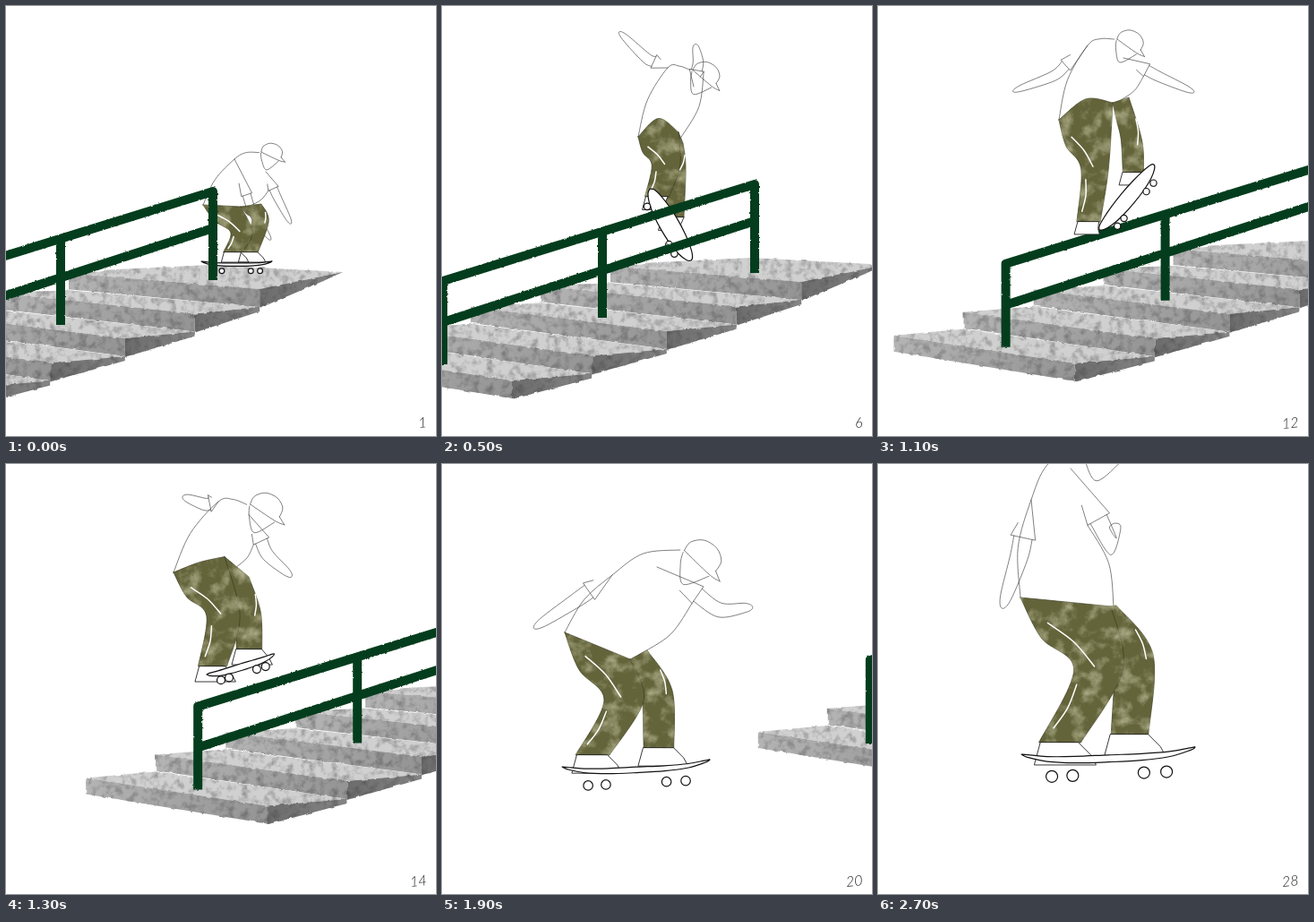
Recreate the animation shown at these times as an HTML page. Size 480x480 px, loop 2.8 s.

```html
<!DOCTYPE html>
<html lang="en">
<head>
<meta charset="utf-8">
<title>Skater on a handrail</title>
<style>
html, body { margin: 0; width: 100%; height: 100%; overflow: hidden; background: #fff; }
svg { display: block; width: 100vw; height: 100vh; }
path, circle { stroke-linejoin: round; stroke-linecap: round; }
.cloth { fill: #64643b; stroke: #3a3a20; stroke-width: .7; }
.thin { fill: none; stroke: #4a4a4a; stroke-width: .7; }
.shoe { fill: #fff; stroke: #222; stroke-width: .9; }
.deck { fill: #fff; stroke: #111; stroke-width: 1.2; }
.shine { fill: none; stroke: #fff; stroke-width: 1.5; }
text { font: italic 300 16px Lato, sans-serif; fill: #222; text-anchor: end; }
</style>
</head>
<body>
<svg id="stage" viewBox="0 0 480 480">
  <defs>
    <linearGradient id="riser"><stop stop-color="#b4b4b4"/><stop offset="1" stop-color="#949494"/></linearGradient>
    <linearGradient id="side"><stop stop-color="#6c6c6c"/><stop offset="1" stop-color="#858585"/></linearGradient>
    <filter id="concrete" filterUnits="userSpaceOnUse" x="-140" y="265" width="650" height="190" color-interpolation-filters="sRGB">
      <feTurbulence type="fractalNoise" baseFrequency=".12" numOctaves="5" seed="4" result="n"/>
      <feDisplacementMap in="SourceGraphic" in2="n" scale="3" xChannelSelector="R" yChannelSelector="G" result="rough"/>
      <feColorMatrix in="n" values="0 0 0 0 .2  0 0 0 0 .2  0 0 0 0 .2  .9 0 0 0 -.4" result="dirt"/>
      <feComposite in="dirt" in2="rough" operator="in" result="stain"/>
      <feMerge><feMergeNode in="rough"/><feMergeNode in="stain"/></feMerge>
    </filter>
    <filter id="brush" filterUnits="userSpaceOnUse" x="-20" y="170" width="400" height="250" color-interpolation-filters="sRGB">
      <feTurbulence type="fractalNoise" baseFrequency=".3" numOctaves="2" seed="7" result="n"/>
      <feDisplacementMap in="SourceGraphic" in2="n" scale="2.2" xChannelSelector="R" yChannelSelector="G"/>
    </filter>
    <filter id="wash" filterUnits="userSpaceOnUse" x="100" y="80" width="240" height="270" color-interpolation-filters="sRGB">
      <feTurbulence type="fractalNoise" baseFrequency=".06" numOctaves="5" seed="11" result="n"/>
      <feColorMatrix in="n" values="0 0 0 0 .7  0 0 0 0 .7  0 0 0 0 .56  2.2 0 0 0 -1" result="pale"/>
      <feComposite in="pale" in2="SourceAlpha" operator="in" result="spots"/>
      <feMerge><feMergeNode in="SourceGraphic"/><feMergeNode in="spots"/></feMerge>
    </filter>
  </defs>
  <g id="stairs"><g id="steps" filter="url(#concrete)"></g></g>
  <g id="skater">
    <path id="ink" class="thin"/>
    <g filter="url(#wash)"><path id="far" class="cloth"/><path id="near" class="cloth"/></g>
    <path id="shine" class="shine"/>
    <path id="shoes" class="shoe"/>
    <path id="deck" class="deck"/>
  </g>
  <g id="rail"><path filter="url(#brush)" fill="none" stroke="#043d1d" stroke-width="10" style="stroke-linecap: butt"
    d="M1 400V307L349 199V298M1 353L349 240M179 252V348"/></g>
  <text id="count" transform="translate(470 470) rotate(-6)"></text>
</svg>
<script>
const $ = id => document.getElementById(id);
const add = (parent, tag, attrs) => {
  const el = document.createElementNS('http://www.w3.org/2000/svg', tag);
  for (const k in attrs) el.setAttribute(k, attrs[k]);
  return parent.appendChild(el);
};
const STEP = 100, COUNT = 28, STAIRS = 5;

// Points and lines
const mix = (a, b, u) => a.map((v, i) => v + (b[i] - v) * u);
const move = ([x, y], dx, dy = 0) => [x + dx, y + dy];
const along = (p, [dx, dy], k) => [p[0] + dx * k, p[1] + dy * k];
const gap = (a, b) => Math.hypot(b[0] - a[0], b[1] - a[1]);
const normal = (a, b) => {
  const d = gap(a, b) || 1;
  return [(a[1] - b[1]) / d, (b[0] - a[0]) / d];
};
const bulge = (a, b, k) => along(mix(a, b, .5), normal(a, b), k * gap(a, b));
const line = pts => 'M' + pts.join('L');
function spline(pts, start = 'M') {
  const at = i => pts[Math.max(0, Math.min(pts.length - 1, i))];
  let d = start + pts[0];
  for (let i = 0; i < pts.length - 1; i++) {
    const [a, b, c, e] = [at(i - 1), at(i), at(i + 1), at(i + 2)];
    d += 'C' + [b.map((v, j) => v + (c[j] - a[j]) / 6), c.map((v, j) => v - (e[j] - b[j]) / 6), c];
  }
  return d;
}

// Staircase, drawn from the top step down
const front = (i, d = 0) => [78 + 92 * i - 2.8 * i * i, 418 - 27.5 * i + d];
const tip = (i, d = 0) => [-124 + 78 * i, 387 - 27 * i + .7 * i * i + d];
const face = (pts, fill) => add($('steps'), 'path', { d: line(pts) + 'Z', fill });
for (let i = STAIRS - 1; i >= 0; i--) {
  const top = i === STAIRS - 1;
  const back = top ? [[240, 286], [345, 281], [494, 289]] : [tip(i + 1, 19), front(i + 1, 20)];
  const corner = back[back.length - 1];
  face([tip(i), ...back, front(i)], '#d0d0d0');
  face([tip(i), front(i), front(i, 20), tip(i, 18)], 'url(#riser)');
  face([front(i), corner, move(corner, top ? -24 : 0, top ? 11 : 5), front(i, 21)], 'url(#side)');
}

// Key poses: count, head width, head tilt, then the joints in this order
const joints = ['head', 'back', 'elbowB', 'handB', 'shoulder', 'elbowF', 'handF', 'seat', 'belt',
  'hip', 'kneeN', 'ankleN', 'kneeF', 'ankleF', 'tail', 'nose'];
const pose = (n, size, tilt, spots) =>
  ({ n, size, tilt, spots: spots.split(' ').map(p => p.split(',').map(Number)) });
const poses = [
  pose(1, 23, .26, '296,166 255,171 276,232 294,259 290,185 303,214 317,241 220,222 262,224 285,221 263,253 253,275 284,240 272,275 218,285 297,285'),
  pose(6, 30, .52, '293,79 252,69 228,58 200,31 281,90 286,62 283,44 219,146 264,141 269,153 250,178 240,213 260,180 258,236 232,204 278,284'),
  pose(12, 29, .43, '280,43 234,44 196,78 154,94 274,58 314,79 350,95 202,127 262,108 280,102 242,182 235,241 283,150 285,186 247,250 308,177'),
  pose(16, 42, .38, '298,61 240,40 248,12 244,-20 268,55 271,125 284,153 172,115 226,99 262,150 243,157 226,211 257,180 258,228 201,220 291,247'),
  pose(20, 42, .58, '288,108 190,124 150,152 106,181 240,115 310,163 344,160 137,188 210,218 229,208 203,264 168,325 240,252 242,317 134,338 299,330'),
  pose(24, 47, .21, '246,63 150,88 122,142 95,190 205,75 240,158 281,154 119,198 204,200 216,182 214,260 161,313 243,230 232,306 119,327 295,320'),
  pose(28, 52, .21, '254,-20 171,40 157,105 140,157 215,5 263,92 265,68 159,149 260,159 266,158 246,230 203,311 286,212 281,302 160,324 354,316')
];

function poseAt(n) {
  let i = 0;
  while (i < poses.length - 2 && n >= poses[i + 1].n) i++;
  const a = poses[i], b = poses[i + 1], u = (n - a.n) / (b.n - a.n);
  const [size, tilt] = mix([a.size, a.tilt], [b.size, b.tilt], u);
  const p = { size, tilt };
  joints.forEach((name, j) => p[name] = mix(a.spots[j], b.spots[j], u));
  return p;
}

// Trouser leg: waist, front edge, cuff, back edge
function leg(waist, knee, ankle, kneeW, cuffW, round) {
  const first = waist[0], last = waist[waist.length - 1];
  const kneeBack = move(knee, -kneeW / 2), cuff = move(ankle, -cuffW / 2);
  return spline(waist) + spline([last, move(knee, kneeW / 2), move(ankle, cuffW / 2)], 'L') +
    spline([cuff, kneeBack, bulge(first, kneeBack, round), first], 'L') + 'Z';
}

// Sleeve and bare arm; also gives the corner of the sleeve at the armpit
function arm(from, elbow, hand, s) {
  const n = normal(from, elbow), end = mix(from, elbow, .65);
  const pit = along(end, n, s * .27);
  const bend = normal(end, hand), palm = normal(elbow, hand), wrist = mix(elbow, hand, .85);
  const edge = k => [along(end, n, k * s * .2), along(elbow, bend, k * s * .19), along(wrist, palm, k * s * .12)];
  const d = line([from, along(end, n, -s * .27), pit, mix(pit, from, .35)]) +
    spline([...edge(-1), mix(elbow, hand, 1.08), ...edge(1).reverse()]);
  return { d, pit };
}

function head(p) {
  const c = Math.cos(p.tilt) * p.size, s = Math.sin(p.tilt) * p.size;
  const at = (x, y) => [p.head[0] + x * c - y * s, p.head[1] + x * s + y * c];
  const dome = [at(-.5, 0), at(-.48, -.28), at(-.2, -.52), at(.2, -.52), at(.48, -.3), at(.5, 0)];
  const d = spline(dome) + line([at(.5, 0), at(.74, .17)]) +
    spline([at(.74, .17), at(.4, .17), at(-.5, 0)]) +
    spline([at(-.5, .06), at(-.38, .37), at(-.03, .77), at(.42, .22)]);
  return { d, neck: at(-.6, .05) };
}

const shoe = (ankle, s, tuck) => line([
  move(ankle, -s * .42), move(ankle, -s * .55, s * .48),
  move(ankle, s * (.78 - .6 * tuck), s * .48), move(ankle, s * (.66 - .5 * tuck), s * .26),
  move(ankle, s * .4)]) + 'Z';

const wheels = [.17, .29, .7, .83].map(u => ({ u, el: add($('skater'), 'circle', { class: 'deck' }) }));

function drawSkater(p) {
  const s = p.size, len = gap(p.tail, p.nose), under = normal(p.tail, p.nose);
  // How far the board is tipped up, showing its underside
  const tuck = ((p.nose[1] - p.tail[1]) / len) ** 2;

  const { d: cap, neck } = head(p);
  const armB = arm(p.back, p.elbowB, p.handB, s), armF = arm(p.shoulder, p.elbowF, p.handF, s);
  const hem = mix(p.belt, p.hip, .5);
  const shirt = spline([neck, bulge(neck, p.back, .13), p.back, bulge(p.back, p.seat, .08), p.seat]) +
    spline([armF.pit, bulge(armF.pit, hem, -.1), hem]);
  $('ink').setAttribute('d', cap + armB.d + armF.d + shirt);

  const waist = move(mix(p.seat, p.belt, .5), 0, -s * tuck * .8);
  $('far').setAttribute('d', leg([p.belt, p.hip], p.kneeF, p.ankleF, s * .8, s * .8, 0));
  $('near').setAttribute('d', leg([p.seat, waist, p.belt], p.kneeN, p.ankleN, s * 1.05, s * .9, .08));

  const gleam = (a, b, dx, u, v) => {
    const q = move(a, dx), r = move(b, dx), from = mix(q, r, u), to = mix(q, r, v);
    return spline([from, bulge(from, to, -.06), to]);
  };
  $('shine').setAttribute('d', gleam(p.seat, p.kneeN, 0, .35, .95) +
    gleam(p.kneeN, p.ankleN, -s * .3, .2, .8) + gleam(p.hip, p.kneeF, s * .22, .5, 1.1));
  $('shoes').setAttribute('d', shoe(p.ankleN, s, tuck) + shoe(p.ankleF, s, tuck));

  const rim = [];
  for (let i = 0; i <= 16; i++) {
    const a = Math.PI * (1 - i / 8), u = (1 + Math.cos(a)) / 2;
    const sag = .045 * len * (1 - (2 * u - 1) ** 4) * (1 - tuck);
    rim.push(along(mix(p.tail, p.nose, u), under, sag + Math.sin(a) * s * (.075 + .38 * tuck)));
  }
  $('deck').setAttribute('d', spline(rim) + 'Z');
  for (const { u, el } of wheels) {
    const [x, y] = along(mix(p.tail, p.nose, u), under, len * .135);
    el.setAttribute('cx', x);
    el.setAttribute('cy', y);
    el.setAttribute('r', s * .125);
  }
}

// The stairs slide away, faster after each stage of the trick
function drawScene(n) {
  const past = k => Math.max(0, n - k);
  const x = 23.6 * (n - 6) + 12.2 * (past(12) + past(16));
  const y = -1.6 * (n - 6) - 1.6 * past(6) - 5.4 * past(12);
  for (const id of ['stairs', 'rail']) $(id).setAttribute('transform', `translate(${x} ${y})`);
  // The rail hides the skater until the board lands on it
  $('stage').insertBefore($('rail'), n < 9 ? $('count') : $('skater'));
}

let shown = 0;
function draw(n) {
  if (n === shown) return;
  shown = n;
  drawSkater(poseAt(n));
  drawScene(n);
  $('count').textContent = n;
}

function tick(now) {
  draw(Math.floor(now / STEP) % COUNT + 1);
  requestAnimationFrame(tick);
}
draw(1);
requestAnimationFrame(tick);
</script>
</body>
</html>
```
